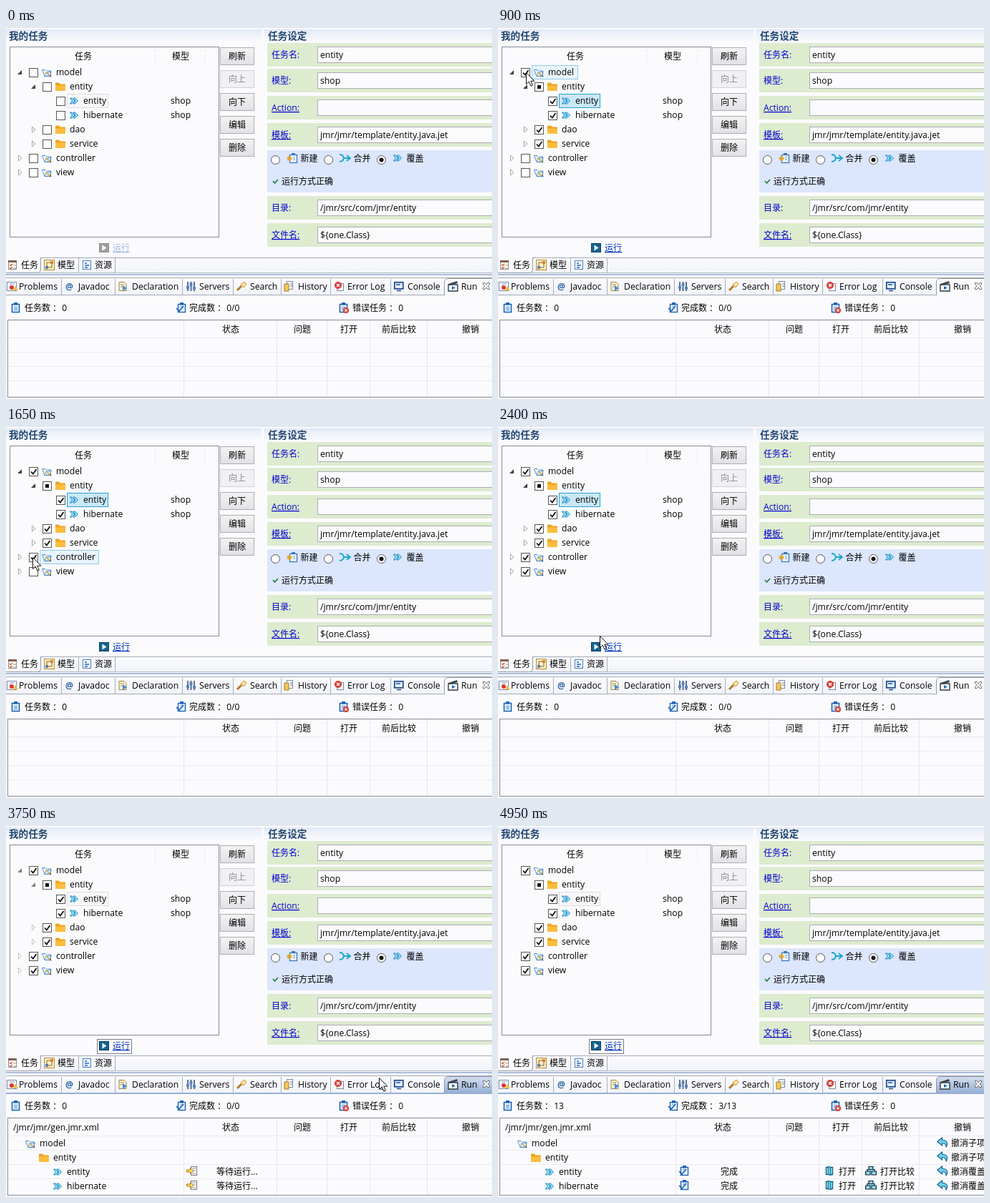
Recreate the animation shown at these times as an HTML page. Size 679x519 px, loop 5.1 s.

```html
<!DOCTYPE html>
<html lang="zh">
<head>
<meta charset="utf-8">
<title>Task runner</title>
<style>
html, body { margin: 0; width: 100%; height: 100%; overflow: hidden; background: #fbfbfe; }
svg { display: block; width: 679px; height: 519px; }
text { font-family: 'Open Sans', 'Noto Sans CJK SC', 'Noto Sans CJK', sans-serif; white-space: pre; }
</style>
</head>
<body>
<svg id="stage" viewBox="0 0 679 519">
<defs>
  <linearGradient id="title" x2="0" y2="1"><stop stop-color="#e4ebf6"/><stop offset="1" stop-color="#fbfbfe"/></linearGradient>
  <linearGradient id="button" x2="0" y2="1"><stop stop-color="#f3f3f5"/><stop offset="1" stop-color="#e2e2e6"/></linearGradient>
  <linearGradient id="bar" x2="0" y2="1"><stop stop-color="#fbfbfe"/><stop offset="1" stop-color="#f1f3f8"/></linearGradient>
  <linearGradient id="active" x2="0" y2="1"><stop stop-color="#d3def0"/><stop offset="1" stop-color="#98b0d6"/></linearGradient>
</defs>
<g id="base"></g><g id="live"></g>
</svg>
<script>
const STEP = 150, LOOP = 5100;
const PAPER = '#fbfbfe', BLUE = '#1b62b5', LINK = '#0000d6', EDGE = '#868b95';

// Drawing helpers
const text = (x, y, s, o = {}) => {
  const size = o.size || (/[\u4e00-\u9fff]/.test(s) ? 12 : 12.2);
  return `<text x="${x}" y="${y}" font-size="${size}" fill="${o.fill || '#000'}"` +
    (o.mid ? ' text-anchor="middle"' : '') + (o.bold ? ' font-weight="700"' : '') +
    (o.line ? ' text-decoration="underline"' : '') + `>${s}</text>`;
};
const rect = (x, y, w, h, fill, stroke = 'none', extra = '') =>
  `<rect x="${x}" y="${y}" width="${w}" height="${h}" fill="${fill}" stroke="${stroke}" ${extra}/>`;
const path = (d, fill, stroke = 'none', w = 1) =>
  `<path d="${d}" fill="${fill}" stroke="${stroke}" stroke-width="${w}"/>`;
const dot = (x, y, r, fill, stroke = 'none') =>
  `<circle cx="${x}" cy="${y}" r="${r}" fill="${fill}" stroke="${stroke}"/>`;
const at = (x, y, s) => `<g transform="translate(${x} ${y})">${s}</g>`;
const hline = (y, color, x1 = 0, x2 = 679) => rect(x1, y, x2 - x1, 1, color);
const vline = (x, y1, y2, color) => rect(x, y1, 1, y2 - y1, color);
// The wide colon sits a little right of the label
const count = (x, label, value) =>
  text(x, 396, `${label}<tspan dx="3">：</tspan><tspan dx="-2"> ${value}</tspan>`);

// Icons, each in a box of about 14 by 14
const clipboard = rect(1.5, 2.5, 10, 11, '#eef6ff', BLUE, 'stroke-width="1.6"') +
  rect(4, 0, 5, 3.5, BLUE) + path('M4 6.5h5M4 8.5h5M4 10.5h5', 'none', '#4d8fd2');
const icon = {
  model: path('M.5 3.5h4l1 1.5h7v7.5H4z', '#d9eafa', '#3d7fc0') +
    path('M.5 3.5l3.5 9 2-6h8', '#f1f8ff', '#6fa3d6') + path('M6.5 7l5 5', 'none', '#e6b03c', 2.2) +
    path('M10.5 12.5l3 1.2-1.2-3z', '#30599a'),
  folder: path('M0 2.5q0-1 1-1h4l1.5 2H13q1 0 1 1V12q0 1-1 1H1q-1 0-1-1z', '#f1a31d') +
    path('M0 5.5h14V12q0 1-1 1H1q-1 0-1-1z', '#fbbd3e'),
  arrows: path('M1.5 3H4l4 4-4 4H1.5l3-4z', '#9ae6f7', '#1c86c0') +
    path('M6 3h2.5l4 4-4 4H6l3-4z', '#9ae6f7', '#1c86c0'),
  clip: clipboard,
  done: rect(3.5, 2.5, 10, 11, '#eef6ff', BLUE, 'stroke-width="1.4"') + rect(6, 0, 5, 3.5, BLUE) +
    path('M6 6h5', 'none', '#4d8fd2') + path('M1 8l4 4 6-7', 'none', BLUE, 1.7),
  fail: clipboard + dot(10, 11, 4, '#d93a34') + path('M8.3 9.3l3.4 3.4m0-3.4l-3.4 3.4', 'none', '#fff', 1.2),
  fresh: rect(4.5, 2.5, 10, 11, '#eef6ff', '#3b78b8', 'stroke-width="1.3"') + rect(7, 0, 5, 3, '#3b78b8') +
    path('M0 7.5h8M4 3.5v8M1.5 5l5 5M6.5 5l-5 5', 'none', '#e0a526', 1.3) + path('M9 6h3M9 9h3', 'none', '#4d8fd2'),
  merge: path('M0 2q5 0 6 5q-1 5-6 5M5 7h9M10 3l5 4-5 4', 'none', '#18a8c8', 1.8),
  wait: rect(6.5, 1.5, 8, 12, '#fff', '#777') + path('M8 4h5M10 7h3M8 11h5', 'none', '#888') +
    path('M0.5 6h5V3.5l4.5 4-4.5 4V9h-5z', '#fbd86c', '#a87812'),
  open: path('M1.5 2.5h9v10h-9z', '#e8fbff', '#075b86', 1.4) + path('M4 1l4 2v11l-4-2z', '#54d0e8', '#075b86'),
  compare: path('M.7 8h6.3v5H.7zM9 8h6.3v5H9zM5 1.5h6v4H5zM3 8V5.5h10V8', '#8fe2f0', '#123', 1.2),
  undo: path('M7.5 1L.8 6.5l6.7 5.5V8.8q6-.3 5.5 5.7 5-9.500-5.500-10.300z', '#6fd2ee', '#14618f', 1.1),
  task: rect(1.5, 1.5, 11, 12, '#fff', '#8a8a8a') + rect(1, 1, 12, 3, '#806050') +
    path('M3 7l1.5 1.5L7 6M3 11l1.5 1.5L7 10', 'none', '#d0552a', 1.3) + path('M8 8h4M8 12h4', 'none', '#999'),
  graph: rect(.5, .5, 14, 14, '#fff0c8', '#b8862e') + rect(2, 9, 4, 4, '#5a7fb8') + rect(9, 2, 4, 4, '#d9822b') +
    path('M4 9V4h5M6 11h5V6', 'none', '#806030'),
  source: rect(1.5, 1.5, 11, 12, '#f4f9ff', '#4a7fc0') + path('M4 5h3M4 8h6M4 11h4', 'none', BLUE, 1.4),
  problems: rect(-3.5, 1.5, 13, 12, '#fff', '#7d87a0') + path('M0 4h7M0 7h4', 'none', '#6a86b8') +
    dot(3, 9, 3, '#d83a32') + path('M8 7l4 6H5z', '#f4bd3c'),
  decl: path('M1 1.5h7l3 3v9H1z', '#fff4d0', '#a08040') + path('M3 5h5M3 8h4', 'none', '#987') +
    path('M6 6l6 4-6 4z', '#438edc'),
  servers: path('M3 1v13M7.5 1v13M12 1v13', 'none', '#3a5278', 1.6) + rect(1, 7, 4, 4, '#5c84c0') +
    rect(5.5, 3, 4, 4, '#5c84c0') + rect(10, 8, 4, 4, '#5c84c0'),
  search: path('M1 13l6-6', 'none', '#b8772c', 3) + path('M6 5l5-4 3 3-4 5z', '#ffe59a', '#c59030'),
  history: rect(3.5, .5, 8, 11, '#fff', '#7b8aa8') + path('M0 4h6v10H0z', '#f5c85a', '#a57a25') +
    path('M8 4h3M8 7h3', 'none', '#57a'),
  error: rect(4.5, 3.5, 9, 10, '#fff', '#7888a0') + dot(6, 6, 5, '#d83a32') +
    path('M4 4l4 4m0-4L4 8', 'none', '#fff', 1.5),
  console: rect(.8, 1.8, 12, 9, '#e7f2ff', '#244f91', 'stroke-width="1.8"') + path('M4 13.5h6M3 5h6', 'none', '#244f91', 1.6),
  run: path('M0 5h13v9H0z', '#fff', '#303840', 1.4) + path('M0 4l12-4 1 3-12 3z', '#38424c') +
    path('M5 7l5 2.5L5 12z', '#1b6fbc')
};

// Tree rows: label, depth, row centre, icon
const tree = [
  ['model', 0, 62, 'model'], ['entity', 1, 82, 'folder'], ['entity', 2, 102, 'arrows'], ['hibernate', 2, 122, 'arrows'],
  ['dao', 1, 142, 'folder'], ['service', 1, 162, 'folder'], ['controller', 0, 182, 'model'], ['view', 0, 202, 'model']
];
const fields = [
  [21, '任务名:', 'entity'], [57, '模型:', 'shop'], [95, 'Action:', '', 1], [133, '模板:', 'jmr/jmr/template/entity.java.jet', 1],
  [235, '目录:', '/jmr/src/com/jmr/entity'], [273, '文件名:', '${one.Class}', 1]
];
const tabs = [
  [0, 'Problems', 'problems'], [77, 'Javadoc', ''], [152, 'Declaration', 'decl'], [246, 'Servers', 'servers'],
  [317, 'Search', 'search'], [384, 'History', 'history'], [453, 'Error Log', 'error'], [537, 'Console', 'console']
];

function drawBase() {
  let s = rect(0, 0, 679, 519, PAPER);
  for (const [x, w, label, tx] of [[0, 357, '我的任务', 4], [360, 319, '任务设定', 366]])
    s += rect(x, 2, w, 18, 'url(#title)') + hline(2, '#dbe3f0', x, x + w) +
      text(tx, 16, label, { size: 13.6, bold: 1, fill: '#21466f' });
  s += rect(5.5, 26.5, 292, 266, PAPER, EDGE) + text(108, 44, '任务', { mid: 1 }) + text(244, 44, '模型', { mid: 1 });
  s += vline(208, 28, 52, '#f2f2f6') + vline(278, 28, 52, '#f2f2f6');
  ['刷新', '向上', '向下', '编辑', '删除'].forEach((label, i) => {
    const off = label == '向上';
    s += rect(299.5, 27.5 + 32 * i, 47, 24, off ? '#f1f1f4' : 'url(#button)', off ? '#d2d2d6' : '#adadb0') +
      text(323, 44 + 32 * i, label, { mid: 1, fill: off ? '#8b8b90' : '#000' });
  });

  for (const [y, label, value, line] of fields)
    s += rect(365, y, 314, 33, '#ddebcf') + rect(435.5, y + 5.5, 260, 22, PAPER, '#abadb3') +
      text(371, y + 21, label, { fill: LINK, line }) + text(439, y + 21, value);
  s += rect(365, 171, 314, 59, '#dce6fd');
  [['新建', 'fresh'], ['合并', 'merge'], ['覆盖', 'arrows']].forEach(([label, name], i) => {
    const x = 376.5 + 74 * i;
    s += dot(x, 184.5, 6, '#fff', '#555') + (i == 2 ? dot(x, 184.5, 3, '#111') : '') +
      at(x + 15.5, 175, icon[name]) + text(x + 35, 187, label);
  });
  s += path('M373 214l2.500 3 4.500-5', 'none', '#27823c', 1.8) + text(385, 219, '运行方式正确');

  s += rect(0, 321, 679, 22, 'url(#bar)') + hline(321, '#a3a9b5', 48) + hline(342, '#b0b7c4') +
    rect(0, 344, 679, 2, '#a9bbda');
  s += path('M0 320H48.5V338q0 4-4 4.5H0z', PAPER) + path('M48.5 321V338q0 4-4 4.5H0', 'none', '#9098a8') +
    vline(101, 322, 342, '#a8aebb') + vline(152, 322, 342, '#a8aebb');
  [[2, 21, '任务', 'task'], [53, 72, '模型', 'graph'], [106, 124, '资源', 'source']].forEach(([x, tx, label, name]) => {
    s += at(x, 324, icon[name]) + text(tx, 336, label);
  });

  s += rect(0, 350, 679, 23, 'url(#bar)') + hline(349, '#a3a9b5') + hline(373, '#a3a9b5');
  for (const [x, label, name] of tabs) {
    if (x) s += vline(x, 351, 373, '#a8aebb');
    s += name ? at(x + 5, 354, icon[name]) : text(x + 6, 366, '@', { fill: '#2761a5', bold: 1 });
    s += text(x ? x + 24 : 18, 366, label);
  }

  s += at(7, 384, icon.clip) + at(237, 384, icon.done) + at(465, 384, icon.fail) + count(484, '错误任务', 0);
  s += rect(2.5, 408.5, 690, 108, PAPER, EDGE);
  for (const y of [433, 453, 473, 493]) s += hline(y, '#ebebf0', 3);
  for (const x of [248, 378, 448, 508, 588]) s += vline(x, 409, 516, '#e6e6ec');
  [[314, '状态'], [414, '问题'], [479, '打开'], [549, '前后比较'], [649, '撤销']].forEach(([x, label]) => {
    s += text(x, 426, label, { mid: 1 });
  });
  return s;
}

function checkbox(x, y, mark) {
  return rect(x + .5, y - 5.5, 12, 12, '#fff', '#555') +
    (mark == 'part' ? rect(x + 4, y - 2, 5, 5, '#111') :
      mark ? path(`M${x + 3} ${y + .5}l2.8 3 4.700-6.500`, 'none', '#111', 1.8) : '');
}

function drawTree(t) {
  const focus = t >= 750 && t < 2550;
  const hover = t >= 600 && t < 1200 ? 'model' : t >= 1500 && t < 1800 ? 'controller' : t >= 1800 && t < 2100 ? 'view' : '';
  const fade = t < 2850 ? 1 : t < 3900 ? .65 : Math.max(0, .65 - (t - 3750) / 600);
  let s = '';
  tree.forEach(([label, depth, y, name], i) => {
    const x = 32 + 19 * depth;
    const since = i < 6 ? 750 : i == 6 ? 1500 : 1950;
    if (i == 2) s += rect(85.5, 92.5, 57, 19, focus ? '#cbe8f6' : '#f7f7f9', focus ? '#26a0da' : '#dedee0');
    if (label == hover) s += rect(47.5, y - 9.5, { model: 64, controller: 82, view: 52 }[label], 19, '#e9f4fc', '#8fcbea');
    if (depth < 2) {
      const arrow = i < 2 ? path(`M${x - 10} ${y - 3}v6h-6z`, '#404040') :
        path(`M${x - 14.5} ${y - 4}v8l4.500-4z`, '#fff', '#a3a3a3');
      s += `<g opacity="${fade}">${arrow}</g>`;
    }
    s += checkbox(x, y, t >= since && (i == 1 ? 'part' : 'full')) + at(x + 18, y - 7, icon[name]) + text(x + 38, y + 4, label);
    if (depth == 2) s += text(230, y + 4, 'shop');
  });
  return s;
}

function drawRun(t) {
  const on = t >= 750;
  let s = rect(130, 301, 14, 13, on ? '#17658f' : '#a0a0a2') + rect(130.5, 301.5, 13, 12, 'none', on ? '#0b3c60' : '#8c8c8e') +
    path('M134.5 303.5l6 4-6 4z', '#fff') + text(149, 312, '运行', { fill: on ? '#0033b8' : '#9db5e4', line: 1 });
  if (t >= 2550) s += rect(127.5, 298.5, 48, 20, 'none', '#000', 'stroke-dasharray="1 1"');
  return s;
}

function drawResults(t) {
  const active = t >= 2850;
  const done = t < 4200 ? 0 : t < 4500 ? 1 : t < 4800 ? 2 : 3;
  const total = t < 4050 ? 0 : 13;
  let s = path('M612.5 373V356q0-5 5-5.5H679V373z', active ? 'url(#active)' : PAPER) +
    path('M612.5 373V356q0-5 5-5.5H679', 'none', '#9098a8') + at(618, 354, icon.run) + text(636, 366, 'Run') +
    path('M666.5 356.5h2.5l2 2.5 2-2.5h2.5v2l-2.5 2.5 2.5 2.5v2H673l-2-2.5-2 2.5h-2.5v-2L669 361l-2.5-2.5z', '#fff', '#666');
  s += active ? rect(0, 373, 679, 2, '#98b0d6') : rect(613, 373, 66, 1, PAPER);
  s += count(26, '任务数', total) + count(256, '完成数', `${done}/${total}`);
  if (!active) return s;

  s += text(10, 426, '/jmr/jmr/gen.jmr.xml');
  tree.slice(0, 4).forEach(([label, depth, , name], i) => {
    const y = 444 + 20 * i, x = 27 + 19 * depth;
    const ready = done >= Math.max(1, i - 1);
    s += at(x, y - 7, icon[name]) + text(x + 20, y + 4, label);
    if (depth == 2) {
      s += at(252, y - 9, ready ? icon.done : icon.wait);
      s += ready ? text(323, y + 4, '完成', { mid: 1 }) : text(294, y + 4, '等待运行...');
      if (ready) s += at(457, y - 9, icon.open) + text(476, y + 4, '打开') + at(513, y - 9, icon.compare) + text(534, y + 4, '打开比较');
    }
    if (ready) s += at(613, y - 9, icon.undo) + text(633, y + 4, depth == 2 ? '撤消覆盖' : '撤消子项');
  });
  return s;
}

// Pointer stops: time, x, y
const route = [
  [150, 330, 420], [600, 39, 62], [1050, 39, 62], [1500, 37, 182], [1650, 37, 182], [1800, 37, 200], [2100, 37, 202],
  [2400, 142, 292], [2550, 152, 305], [2850, 152, 305], [3150, 243, 323], [3750, 521, 352], [4200, 700, 372]
];
function drawPointer(t) {
  const i = route.findIndex(p => p[0] > t);
  if (i < 1) return '';
  const [a, b] = [route[i - 1], route[i]];
  const k = (t - a[0]) / (b[0] - a[0]);
  const pos = n => Math.round(a[n] + (b[n] - a[n]) * k);
  return at(pos(1) + .5, pos(2) + .5, path('M0 0V16L3.7 12.6 6.4 18.6 8.8 17.5 6.2 11.7H11.3z', '#fff', '#111'));
}

const live = document.getElementById('live');
document.getElementById('base').innerHTML = drawBase();
const start = performance.now();
let last = -1;
function render(now) {
  const t = Math.floor(Math.max(0, now - start) % LOOP / STEP) * STEP;
  if (t != last) {
    live.innerHTML = drawTree(t) + drawRun(t) + drawResults(t) + drawPointer(t);
    last = t;
  }
  requestAnimationFrame(render);
}
render(start);
</script>
</body>
</html>
```
